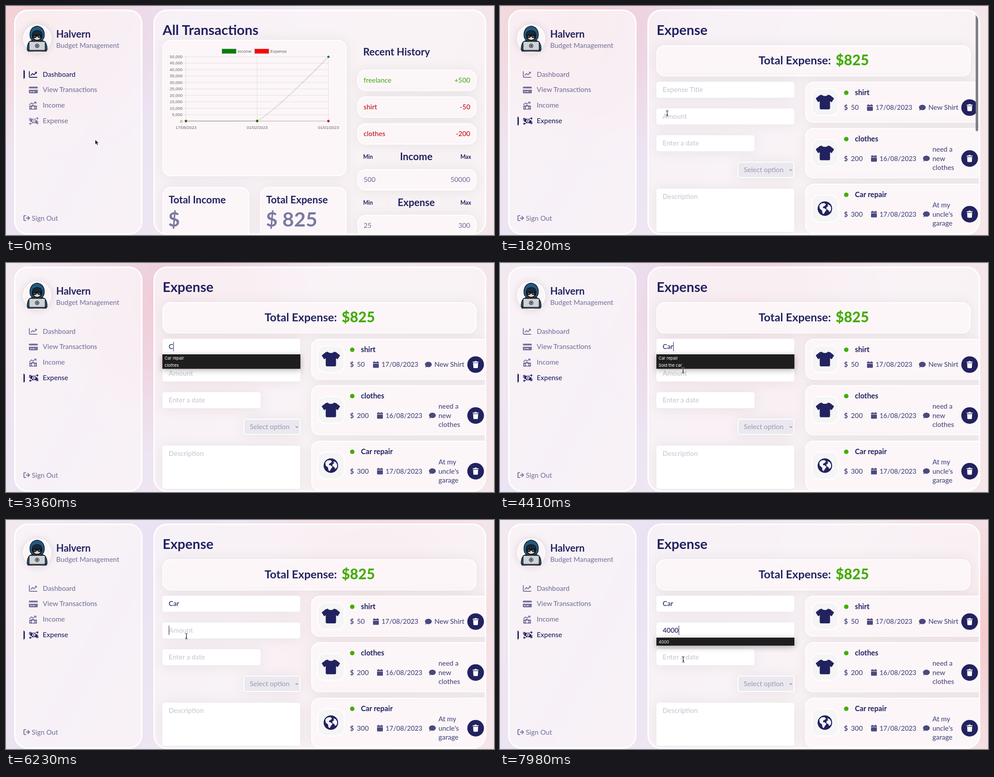
An HTML page that plays this animation: 1089 px wide and 514 px high, repeating every 8000 ms.

```html
<!DOCTYPE html>
<html lang="en">
<head>
<meta charset="utf-8">
<title>Budget dashboard</title>
<style>
html, body { margin: 0; width: 100%; height: 100%; overflow: hidden; background: #f0e8f0; }
svg { display: block; width: 100vw; height: 100vh; }
text { font-family: Lato, "Open Sans", sans-serif; font-size: 15.3px; font-weight: 500; fill: #222260; white-space: pre; }
.b { font-weight: 700; }
.soft { fill: #7a79a0; }
.ph { fill: #c9c8d5; }
.meta { fill: #4a4a7e; }
.chart text { font: 9.4px "Liberation Sans", Arial, sans-serif; fill: #666; }
.list text { font: 9.2px Inter, Roboto, sans-serif; fill: #fff; }
.shadow { filter: drop-shadow(0 1px 14px rgba(0, 0, 0, .065)); }
</style>
</head>
<body>
<svg id="stage" viewBox="0 0 1089 514" preserveAspectRatio="none"></svg>
<script>
const NAVY = '#222260', GREEN = '#42ad00', RED = '#bd171d';
const LOOP = 8000, PAGE_AT = 1330;

const text = (x, y, s, o = {}) =>
  `<text x="${x}" y="${y}" class="${o.cls || ''}" text-anchor="${o.at || 'start'}" style="${o.size ? `font-size:${o.size}px;` : ''}${o.fill ? `fill:${o.fill};` : ''}${o.weight ? `font-weight:${o.weight}` : ''}">${s}</text>`;
const bold = (x, y, s, size, o = {}) => text(x, y, s, { cls: 'b', size, ...o });
const rect = (x, y, w, h, r, fill, extra = '') =>
  `<rect x="${x}" y="${y}" width="${w}" height="${h}" rx="${r}" fill="${fill}" ${extra}/>`;
const path = (d, extra = '') => `<path d="${d}" ${extra}/>`;
const line = (d, w, color = 'currentColor') =>
  path(d, `fill="none" stroke="${color}" stroke-width="${w}" stroke-linecap="round" stroke-linejoin="round"`);
const circle = (x, y, r, fill, extra = '') => `<circle cx="${x}" cy="${y}" r="${r}" fill="${fill}" ${extra}/>`;
const group = (id, body, extra = '') => `<g id="${id}" ${extra}>${body}</g>`;
const at = (x, y, body) => `<g transform="translate(${x} ${y})">${body}</g>`;
const card = (x, y, w, h, r = 18) =>
  rect(x + 1, y + 1, w - 2, h - 2, r, '#fcf6f9', 'stroke="#fff" stroke-width="2" class="shadow"');

// Sidebar
const avatar = () =>
  circle(69.5, 73, 30.5, '#fbf5f8', 'stroke="#fff" stroke-width="2" style="filter:drop-shadow(0 1px 9px rgba(0,0,0,.13))"') +
  `<g stroke="#10161f" stroke-width="1.4" stroke-linejoin="round">` +
  path('M47.5 99C46.5 86 50 80 58 77.5H81C89 80 92.5 86 91.5 99Z', 'fill="#235a80"') +
  path('M69.5 45C58 46.5 52.5 55 53.5 67C54 75 60 80 69.5 80S85 75 85.5 67C86.5 55 81 46.5 69.5 45Z', 'fill="#235a80"') +
  path('M69.5 55C61.5 55.5 58 60 58.5 67C59 73.5 63 77.5 69.5 77.5S80 73.5 80.5 67C81 60 77.5 55.5 69.5 55Z', 'fill="#152b3d"') +
  path('M60.5 66H78.5C78 72.5 74.5 76 69.5 76S61 72.5 60.5 66Z', 'fill="#f3cdb0" stroke="none"') +
  path('M59.5 65H79.5V68Q78.5 71 75 71Q71.5 71 70.5 67.5H68.5Q67.5 71 64 71Q60.5 71 59.5 68Z', 'fill="#10161f"') +
  rect(51.5, 79.5, 36, 20.5, 2.5, '#cfd2d6') + circle(69.5, 89.5, 4, '#f1f2f4') + circle(69.5, 89.5, 1.4, '#10161f') +
  path('M49 99.5H90V101.5H49Z', 'fill="#a9adb3"') + '</g>' +
  line('M62.5 67.5l3 1M72.5 67.5l3 1', .9, '#dce8f0');

const icons = [
  line('M52 147V158.2Q52 160 53.8 160H69', 1.9) + line('M55.5 155.6L59.2 151.6 62.6 154.4 67.6 149', 1.9) + line('M65 148.6H68V151.5', 1.5),
  path('M53 181H69Q71 181 71 183V185H51V183Q51 181 53 181ZM51 188H71V194Q71 196 69 196H53Q51 196 51 194ZM54 191.6V193H57.5V191.6ZM59 191.6V193H64V191.6Z', 'fill-rule="evenodd"'),
  line('M52.5 221.5L57 217.5 60.5 220 66.5 215.8M63.5 215.6H67V219', 1.7) +
    path('M52 223.6H56L60 221.6 64 223.6H69V232.6H52ZM60.5 225.2A2.9 2.9 0 1 0 60.5 231A2.9 2.9 0 1 0 60.5 225.2ZM54 227H56V229.4H54ZM65 227H67V229.4H65Z', 'fill-rule="evenodd"'),
  path('M55 253.2H66V256.4H70V263H57.5V260H54V254.2ZM62 254.6A3.4 3.4 0 1 0 62 261.4A3.4 3.4 0 1 0 62 254.6Z', 'fill-rule="evenodd"') + circle(62, 258, 1.5, 'currentColor') +
    line('M52.5 257V252.3H56M67 252.3H71.5M69.7 250.5L71.7 252.3 69.7 254.2M71.3 259.5V264.2H68M57 264.2H52.5M54.5 262.4L52.5 264.2 54.5 266', 1.5)
];
const labels = ['Dashboard', 'View Transactions', 'Income', 'Expense'];
const navY = i => 153.5 + i * 34.9;

const sidebar = () =>
  avatar() + bold(112, 71, 'Halvern', 22) + text(112, 94, 'Budget Management', { cls: 'soft' }) +
  labels.map((s, i) => group('nav' + i, `<g fill="${NAVY}" color="${NAVY}">${icons[i]}</g>` + text(82, navY(i) + 5, s))).join('') +
  group('bar', path('M39 -10Q42 -9.5 42 -6.5V6.5Q42 9.5 39 10Z', `fill="${NAVY}"`)) +
  `<g color="#7a79a0">${line('M44 470.5H41.5Q40 470.5 40 472V480Q40 481.5 41.5 481.5H44M45 476H52M49 472.4L52.6 476 49 479.6', 2.1)}</g>` +
  text(57.5, 481.5, 'Sign Out', { cls: 'soft' });

// Dashboard page
function chart() {
  const x0 = 401.5, y0 = 258.5, dx = 159, dy = 14.47, grid = 'rgba(0,0,0,.1)';
  let s = '';
  for (let i = 0; i <= 10; i++) {
    const y = y0 - i * dy;
    s += path(`M395 ${y}H${x0 + 2 * dx}`, `stroke="${grid}"`) +
      text(394, y + 3.2, (i * 5000).toLocaleString('en-US'), { at: 'end' });
  }
  ['17/08/2023', '01/02/2023', '01/01/2023'].forEach((d, i) => {
    const x = x0 + i * dx;
    s += path(`M${x} 113.8V265.5`, `stroke="${grid}"`) + text(x, 275.7, d, { at: 'middle' });
  });
  [['Income', 'green', 482], ['Expense', 'red', 555]].forEach(([name, color, x]) => {
    s += rect(x, 96.5, 31.5, 10, 0, color, `stroke="${grid}" stroke-width="2.6"`) + text(x + 35, 104.7, name);
  });
  s += line(`M${x0} 258.2H719.5`, 2.6, grid) +
    line(`M${x0} 258C${x0} 258 533.5 258.5 560.5 257.5C597 241 719.5 114 719.5 114`, 2.6, grid);
  [0, 1, 2].forEach(i => s += circle(x0 + i * dx, 258.2, 2.6, '#d00010'));
  [258, 257.8, 114].forEach((y, i) => s += circle(x0 + i * dx, y, 2.5, '#087a08'));
  return `<g class="chart">${s}</g>`;
}

const range = (y, name, min, max) =>
  bold(797, y + 4.5, 'Min', 12.3) + bold(915.5, y + 7.5, name, 22.2, { at: 'middle' }) + bold(1038, y + 4.5, 'Max', 12.3, { at: 'end' }) +
  card(784, y + 27.5, 266, 48) + text(798, y + 56.5, min, { cls: 'soft' }) + text(1036, y + 56.5, max, { cls: 'soft', at: 'end' });

const dashboard = () =>
  bold(349.5, 65, 'All Transactions', 30.6) + card(349, 76, 411, 306) + chart() +
  card(349, 406, 194, 130) + card(567, 406, 193, 130) +
  bold(363, 442.5, 'Total Income', 22.4) + bold(580.5, 442.5, 'Total Expense', 22.4) +
  bold(362, 495, '$', 44.8, { fill: '#7a79a0' }) + bold(580, 495, '$ 825', 44.8, { fill: '#7a79a0' }) +
  bold(797, 110.5, 'Recent History', 22.5) +
  [['freelance', '+500', '#4cb01a'], ['shirt', '-50', RED], ['clothes', '-200', RED]].map(([name, sum, fill], i) => {
    const y = 143 + i * 60;
    return card(784, y, 266, 48) + text(798, y + 29, name, { fill }) + text(1036, y + 29, sum, { fill, at: 'end' });
  }).join('') +
  range(338.5, 'Income', '500', '50000') + range(441.2, 'Expense', '25', '300');

// Expense page
const shirt = path('M-7 -16C-5 -12 5 -12 7 -16L12 -14.5 20 -8 15 0 11 -2.5V14Q11 16 9 16H-9Q-11 16 -11 14V-2.5L-15 0 -20 -8 -12 -14.5Z',
  `fill="${NAVY}" stroke="${NAVY}" stroke-linejoin="round"`);
const globe = circle(0, 0, 16.2, NAVY) +
  path('M-12 -7L-8 -11 -1 -12 2 -9 -1 -6 -4 -5 -5 -1 0 0 3 3 0 7 -3 12 -5 10 -6 4 -11 0ZM6 -9L11 -7 13.5 -2 13 4 10 7 8 3 4 1 4 -3 8 -5Z',
    'fill="#f5f5f5" stroke="#f5f5f5" stroke-linejoin="round"');
const trash = circle(0, 0, 18.6, NAVY) +
  path('M-6.5 -6.5H-2.6L-1.8 -8H1.8L2.6 -6.5H6.5V-4.6H-6.5ZM-5.6 -3.4H5.6L5 6.6Q4.9 8 3.5 8H-3.5Q-4.9 8 -5 6.6Z', 'fill="#fff"');
const calendar = path('M-4.4 -7.5H-2.6V-6H2.6V-7.5H4.4V-6H6.5V-3H-6.5V-6H-4.4ZM-6.5 -2H6.5V6Q6.5 7.3 5.2 7.3H-5.2Q-6.5 7.3 -6.5 6Z', 'fill="#4a4a7e"');
const bubble = path('M0 -6.3C4.4 -6.3 7.6 -3.6 7.6 -.3S4.4 5.7 0 5.7Q-2 5.7 -3.6 5Q-5 6.4 -7.4 6.6Q-6 5 -5.8 3.4Q-7.6 1.8 -7.6 -.3C-7.6 -3.6 -4.4 -6.3 0 -6.3Z', 'fill="#4a4a7e"');

function item(y, h, icon, name, sum, date, note) {
  const wide = sum.length > 2 ? 9 : 0;
  const top = y + 24.7, mid = y + (h > 100 ? 68.3 : 58), box = y + h / 2 - 30.5;
  const first = mid + 5.3 - (note.length - 1) * 10.2;
  return card(681, y, 410, h) +
    rect(696, box, 59, 60, 17, '#f5f5f5', 'stroke="#fff" stroke-width="2"') + at(725, box + 30, icon) +
    circle(772.7, top, 5, GREEN) + bold(792, top + 5.5, name, 16.3) +
    bold(767.5, mid + 5.3, '$', 15.3, { cls: 'meta b' }) + text(783, mid + 5.3, sum, { cls: 'meta' }) +
    at(825.5 + wide, mid, calendar) + text(838 + wide, mid + 5.3, date, { cls: 'meta', size: 14.8 }) +
    at(942.5 + wide, mid, bubble) +
    note.map((s, i) => text(956 + wide, first + i * 20.3, s, { cls: 'meta' })).join('') +
    at(1048, mid, trash);
}

const field = (y, w, h = 36) => rect(349, y, w, h, 5, '#fff', 'class="shadow"');
const list = (id, y, h, body) => group(id,
  rect(349, y, 308, h, 0, '#1e1e1e', 'style="filter:drop-shadow(0 3px 7px rgba(0,0,0,.3))"') + body, 'class="list"');

const expense = () =>
  bold(349.5, 65, 'Expense', 30.4) + card(349, 88, 701, 70) +
  bold(577, 131, 'Total Expense:', 25.2) + bold(749, 133, '$825', 32, { fill: GREEN, weight: 800 }) +
  item(170, 92, shirt, 'shirt', '50', '17/08/2023', ['New Shirt']) +
  item(274, 112.5, shirt, 'clothes', '200', '16/08/2023', ['need a', 'new', 'clothes']) +
  item(399, 112.5, globe, 'Car repair', '300', '17/08/2023', ['At my', "uncle's", 'garage']) +
  field(170, 307.5) + field(230, 307.5) + field(290, 219) + field(410, 307.5, 97) +
  rect(531, 350.5, 125, 34.5, 5, '#ebe9ef', 'stroke="#fff" stroke-width="2" class="shadow"') +
  text(544, 373, 'Select option', { fill: '#a09fb4' }) + line('M646.7 367L649 369.4 651.3 367', 1.1, '#77768c') +
  text(363, 313, 'Enter a date', { cls: 'ph' }) + text(363, 433, 'Description', { cls: 'ph' }) +
  '<text id="title" x="363" y="193"/><text id="amount" x="363" y="253"/>' +
  list('titleList', 205, 32.5, text(354, 217, 'Car repair') + '<text id="second" x="354" y="232.5"/>') +
  list('amountList', 264, 18, text(354, 276.5, '4000')) +
  group('caret', rect(-.2, 0, 1.1, 21, 0, NAVY)) +
  group('scroll', rect(1061.5, 11, 5.5, 270, 2.75, '#7f7c82'));

const cursors =
  group('arrow', path('M0 0V11.2L2.6 8.8 4.2 12.6 6.2 11.8 4.6 8.1H8Z', 'fill="#000" stroke="#fff" stroke-width=".9"')) +
  group('hand', path('M-1.3 .8Q0 -.9 1.3 .8V4.6Q2.6 4 3.2 5Q4.6 4.6 5 5.7Q6.5 5.6 6.5 7.2V9.6Q6.3 11.4 5.3 13.3H-.8Q-2 11.4 -4.3 8.6Q-5 7.2 -3.6 6.8Q-2.4 6.9 -1.3 8.3Z',
    'fill="#fff" stroke="#111" stroke-width="1"') + line('M1 9V11.4M2.8 9V11.4M4.6 9V11.4', .6, '#111')) +
  group('beam', line('M-2.4 -6Q0 -6 0 -4.6Q0 -6 2.4 -6M0 -4.6V4.6M-2.4 6Q0 6 0 4.6Q0 6 2.4 6M-1.2 2.5H1.2', 2.2, '#fff9') +
    line('M-2.4 -6Q0 -6 0 -4.6Q0 -6 2.4 -6M0 -4.6V4.6M-2.4 6Q0 6 0 4.6Q0 6 2.4 6M-1.2 2.5H1.2', 1.1, '#111'));

const panel = (x, w) => rect(x, 9.5, w, 502.5, 29, 'rgba(252,246,249,.78)', 'stroke="#fff" stroke-width="3"');

document.getElementById('stage').innerHTML = `
<defs>
  <linearGradient id="base" x2="1" y2=".25">
    <stop stop-color="#f2e9ef"/><stop offset=".3" stop-color="#eae2f4"/>
    <stop offset=".65" stop-color="#f1e8f0"/><stop offset="1" stop-color="#f4e6e9"/>
  </linearGradient>
  <radialGradient id="glow">
    <stop stop-color="#f6b0b2" stop-opacity=".5"/><stop offset=".45" stop-color="#f6b4b8" stop-opacity=".3"/>
    <stop offset="1" stop-color="#f6c0c8" stop-opacity="0"/>
  </radialGradient>
  <clipPath id="inside"><rect x="331" y="11" width="738" height="500" rx="28"/></clipPath>
</defs>
${rect(0, 0, 1089, 514, 0, 'url(#base)')}${group('orb', circle(0, 0, 350, 'url(#glow)'))}
${panel(19.5, 283.5)}${panel(330.5, 739.5)}${sidebar()}
<g clip-path="url(#inside)">${group('dash', dashboard())}${group('exp', expense())}</g>${cursors}`;

const $ = id => document.getElementById(id);
const show = (id, on) => $(id).setAttribute('display', on ? 'inline' : 'none');
const move = (id, x, y) => $(id).setAttribute('transform', `translate(${x} ${y})`);
const within = (t, spans) => spans.some(([a, b]) => t >= a && t < b);

// Last value whose start time has passed
const step = (t, list) => list.reduce((v, [from, value]) => t >= from ? value : v, '');

const route = [
  [0, 199, 300], [70, 199, 300], [840, 126, 259], [1190, 122, 260], [1400, 122, 260], [1820, 373, 241],
  [2240, 380, 192], [4220, 380, 192], [4410, 408.5, 241], [4620, 402.5, 259.5], [7780, 402.5, 262], [7980, 409, 313]
];
function pointer(t) {
  const i = route.findIndex(k => k[0] > t);
  if (i < 0) return route[route.length - 1].slice(1);
  const [ta, xa, ya] = route[i - 1], [tb, xb, yb] = route[i];
  const u = (t - ta) / (tb - ta), e = u * u * (3 - 2 * u);
  return [xa + (xb - xa) * e, ya + (yb - ya) * e];
}

const titleKeys = [[3220, 'C'], [3640, 'Ca'], [3920, 'Car']];
const amountKeys = [[6650, '4'], [6930, '40'], [7070, '400'], [7280, '4000']];
const caretSpans = [[2380, 2940], [3220, 5600], [6230, 7420], [7910, LOOP]];

function fill(id, value, hint) {
  const el = $(id);
  el.textContent = value || hint;
  el.setAttribute('class', value ? '' : 'ph');
  return value ? el.getComputedTextLength() : 0;
}

function draw(t) {
  const second = t >= PAGE_AT, active = second ? 3 : 0;
  const phase = Math.abs(t - 600) / 7500;
  move('orb', phase * 1089 - 10, phase * 270 - 10);

  labels.forEach((_, i) => $('nav' + i).setAttribute('opacity', i === active ? 1 : .6));
  move('bar', 0, navY(active));
  show('dash', !second);
  show('exp', second);

  const inAmount = t >= 4900;
  const titleW = fill('title', step(t, titleKeys), 'Expense Title');
  const amountW = fill('amount', step(t, amountKeys), 'Amount');
  $('second').textContent = t < 3640 ? 'clothes' : 'Sold the car';
  show('titleList', t >= 3220 && !inAmount);
  show('amountList', t >= 6650);
  show('caret', within(t, caretSpans));
  move('caret', 363.3 + (inAmount ? amountW : titleW), inAmount ? 237 : 177);
  $('scroll').setAttribute('opacity', Math.max(0, Math.min(1, (3100 - t) / 220)));

  const [x, y] = pointer(t);
  const hidden = within(t, [[3220, 4270], [6650, 7840]]);
  const kind = x < 285 ? (y < 275 ? 'hand' : 'arrow') : x < 349 ? 'arrow' : 'beam';
  ['arrow', 'hand', 'beam'].forEach(id => {
    show(id, id === kind && !hidden);
    move(id, x, y);
  });
}

const start = performance.now();
function tick() {
  draw((performance.now() - start) % LOOP);
  requestAnimationFrame(tick);
}
tick();
</script>
</body>
</html>
```
